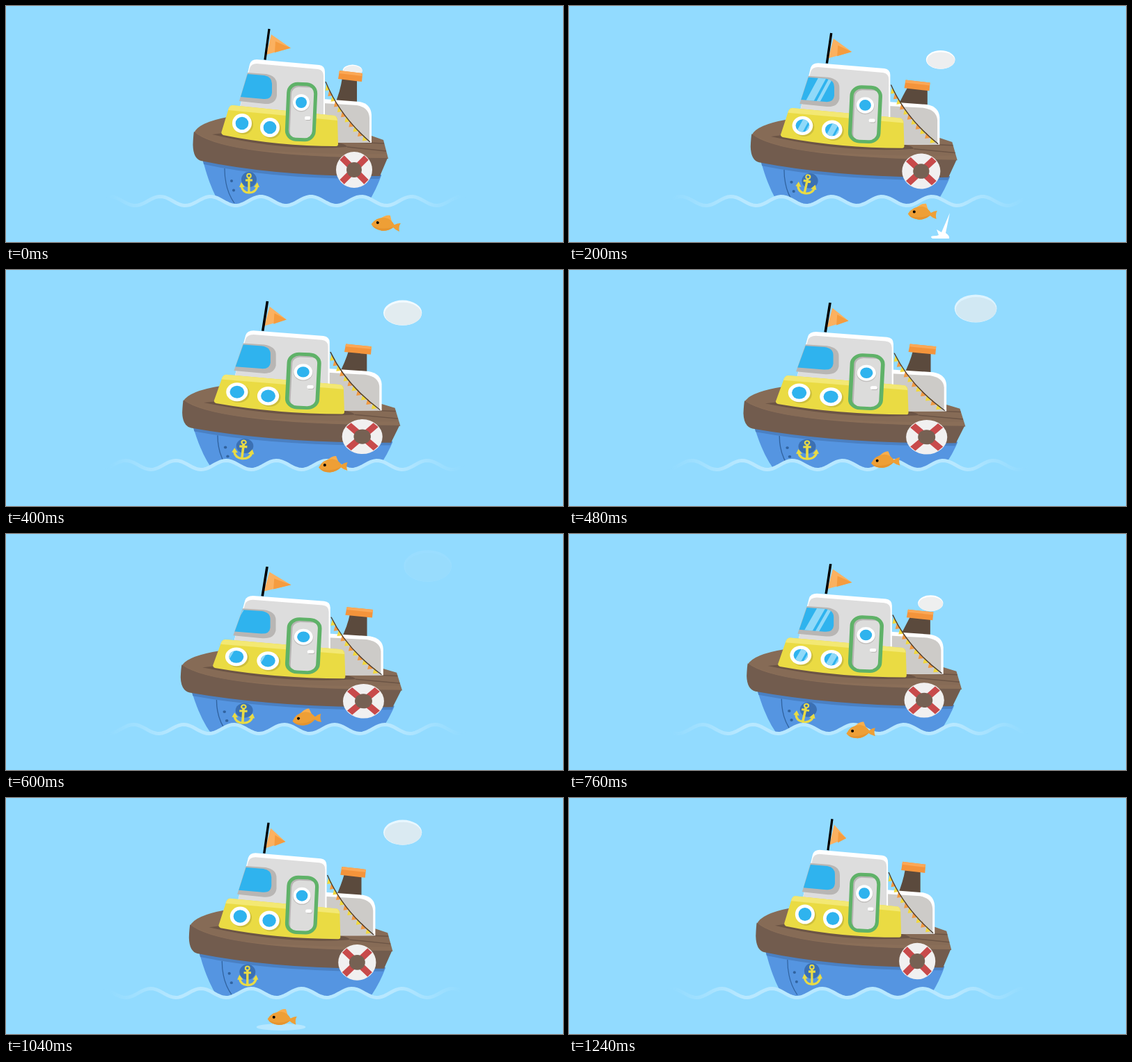
An HTML page that plays this animation: 800 px wide and 340 px high, repeating every 1280 ms.

```html
<!DOCTYPE html>
<html lang="en">
<head>
<meta charset="utf-8">
<title>Tugboat</title>
<style>
  html, body { margin: 0; width: 100%; height: 100%; overflow: hidden; background: #92dbff; }
  svg { display: block; width: 800px; height: 340px; }
</style>
</head>
<body>
<svg viewBox="0 0 800 340">
  <defs>
    <linearGradient id="fade" gradientUnits="userSpaceOnUse" x1="148" x2="654" y1="0" y2="0">
      <stop offset="0" stop-color="#b8e8ff" stop-opacity="0"/>
      <stop offset=".2" stop-color="#b8e8ff"/>
      <stop offset=".8" stop-color="#b8e8ff"/>
      <stop offset="1" stop-color="#b8e8ff" stop-opacity="0"/>
    </linearGradient>
    <clipPath id="paneClip"><path id="pane" d="M347 98L371 100Q382 102 382 112V125Q381 135 370 134L337 131Z"/></clipPath>
    <clipPath id="portClip"><circle r="9.3"/></clipPath>
    <clipPath id="surface"><path d="M0 0H800V331H0Z"/></clipPath>
    <path id="glint" fill="#8fd9f9" d="M5 -20H16L-4 20H-15ZM20 -20H25L5 20H0Z"/>
    <g id="port">
      <circle cx="2" cy="2" r="14" fill="#cdbf3c"/>
      <circle r="14" fill="#fff"/>
      <circle r="9.3" fill="#2fb3ee"/>
      <g clip-path="url(#portClip)"><use class="portGlint" href="#glint"/></g>
    </g>
    <g id="puff">
      <ellipse rx="1" ry="1" fill="#fff"/>
      <ellipse cx=".02" cy=".08" rx=".96" ry=".9" fill="#eeefef"/>
    </g>
  </defs>

  <use id="puffA" href="#puff"/>
  <use id="puffB" href="#puff"/>

  <g id="boat">
    <!-- hull -->
    <path fill="#5595e1" d="M282 219L539 244Q530 270 514 292H312Q294 268 282 219Z"/>
    <path fill="#4a80c3" d="M282 219L539 243L536 249Q385 250 284 228Z"/>
    <path fill="none" stroke="#31639f" stroke-width="1.2" d="M314 234Q314 264 328 284"/>
    <g fill="#31639f"><circle cx="324" cy="252" r="2"/><circle cx="327" cy="265.5" r="2"/></g>
    <circle cx="349" cy="250" r="11" fill="#3b70b3"/>
    <g id="anchor" fill="none" stroke="#e9db45" stroke-width="3.2">
      <circle cx="349" cy="244.5" r="2.8" stroke-width="2"/>
      <path d="M349 247V268M344 251H354M338 259Q340 269 349 269Q359 269 361 259"/>
      <path fill="#e9db45" stroke="none" d="M335 261L338 254L343 261ZM356 261L361 254L364 261Z"/>
    </g>

    <!-- deck -->
    <path fill="#866b56" d="M270 183Q276 168 318 160L525 187L542 193L549 220L400 222L271 195Z"/>
    <path fill="#725c4e" d="M270 181Q310 216 548 219L537 245Q390 246 280 223Q269 220 268.5 200Q269 186 270 181Z"/>
    <path fill="#8a6e58" d="M270 181Q310 207 400 210Q470 214 546 213L548 219Q310 217 270 181Z"/>
    <path fill="#6b5445" d="M296 185Q400 210 490 203Q488 198 470 196L312 183Z"/>
    <path fill="none" stroke="#6b5445" stroke-width="1.5" d="M500 196L543 198M490 203L546 209"/>

    <!-- funnel -->
    <path id="stack" fill="#5b4a3d"/>
    <g id="cap">
      <path fill="#f4943b" d="M479 93L512 97L511 109L477 105Z"/>
      <path fill="#fba856" d="M479 93L512 97L511.5 101L478 97Z"/>
    </g>

    <!-- cabins -->
    <path fill="#fff" d="M456 134L508 138Q524 141 525 157V197H456Z"/>
    <path fill="#cdcbc8" d="M456 140L504 143Q521 146 522 161V197H456Z"/>
    <path fill="#fff" d="M335 150L350 84Q352 77 360 77L450 85Q458 86 458 95V162Z"/>
    <path fill="#ddd" d="M335 150L350 90Q352 83 360 83L448 91Q456 92 456 101V162Z"/>
    <path fill="#b8b6b4" d="M347 96L374 98Q389 101 389 113V129Q387 142 372 141L335 137Z"/>
    <use href="#pane" fill="#2fb3ee"/>
    <g clip-path="url(#paneClip)"><use id="paneGlint" href="#glint"/></g>
    <path fill="#eadb43" d="M325 143L472 158Q475 159 476 163L477 199Q477 202 474 202Q390 202 312 186Q308 184 310 180L320 147Q322 143 325 143Z"/>
    <path fill="#f3e873" d="M325 143L472 158Q475 159 476 165L319 150Q321 143 325 143Z"/>
    <use href="#port" x="339" y="169"/>
    <use href="#port" x="379" y="175"/>

    <!-- door -->
    <g transform="rotate(2.5 424 153)">
      <rect x="404.5" y="112.5" width="39" height="80" rx="13" fill="#b7b5b3"/>
      <rect x="409" y="117" width="35" height="75" rx="10" fill="#dcdcdb"/>
      <rect x="404.5" y="112.5" width="39" height="80" rx="13" fill="none" stroke="#5fb268" stroke-width="5"/>
    </g>
    <circle cx="424" cy="140" r="12.5" fill="#c3c1bf"/>
    <circle cx="424" cy="139" r="12" fill="#fff"/>
    <circle cx="424" cy="139" r="8" fill="#2fb3ee"/>
    <rect x="430" y="160" width="8" height="5" rx="2" fill="#b7b5b3"/>
    <rect x="429" y="159" width="8.5" height="5" rx="2" fill="#fff"/>

    <!-- bunting, flag, life ring -->
    <g id="bunting"></g>
    <path fill="none" stroke="#4a3b30" stroke-width="1.3" d="M459 109Q479 158 523 196"/>
    <path id="flag" fill="#fbb160"/>
    <path id="fold" fill="#f59c3f"/>
    <path stroke="#000" stroke-width="3.2" d="M372 77.5L378 33"/>
    <circle cx="500" cy="236" r="26" fill="#f1f0f0"/>
    <path stroke="#c84a4b" stroke-width="9" d="M482.5 218.5L517.5 253.5M517.5 218.5L482.5 253.5"/>
    <circle cx="500" cy="236" r="11" fill="#766153"/>
  </g>

  <path id="water" fill="#92dbff"/>
  <path id="wave" fill="none" stroke="url(#fade)" stroke-width="5"/>

  <ellipse id="ripple" cx="395" cy="330" fill="#b6e7ff"/>
  <path id="splash" fill="#fff" d="M547 298L541 327Q547 331 546 335H522Q516 331 528 331L531 330L528 322L535 326Z"/>
  <g clip-path="url(#surface)">
    <g id="fish">
      <path fill="#f9ae4d" d="M-8 -6Q0 -13 6 -12L9 -3Z"/>
      <path fill="#ee9f36" d="M-20 3Q-14 -8 0 -8Q8 -7 13 1Q18 -2 22 -2Q19 3 21 10Q15 8 12 5Q5 11 -4 11Q-16 10 -20 3Z"/>
      <path fill="#e5942f" d="M-18 5Q-4 11 12 4Q5 11 -4 11Q-14 10 -18 5Z"/>
      <circle cx="-11" r="2"/>
    </g>
  </g>
</svg>

<script>
const LOOP = 1280, PUFF_EVERY = 640, GUST_EVERY = 560;
const WAVELENGTH = 72.2;
const $ = id => document.getElementById(id);
const set = (id, attrs) => { for (const k in attrs) $(id).setAttribute(k, attrs[k]); };
const clamp01 = v => Math.max(0, Math.min(1, v));
const portGlints = document.querySelectorAll('.portGlint');

function hangBunting(count) {
  for (let i = 1; i <= count; i++) {
    const s = i / (count + 1), r = 1 - s;
    const x = 459 * r * r + 958 * s * r + 523 * s * s;
    const y = 109 * r * r + 316 * s * r + 196 * s * s;
    const color = i % 2 ? '#f1d83e' : '#f29a41';
    $('bunting').innerHTML += `<path fill="${color}" d="M${x - 2} ${y - 4}L${x + 3} ${y + 4}L${x - 4} ${y + 5}Z"/>`;
  }
}

function drawPuff(id, age, y, speed, life) {
  const size = `${14 + .034 * age} ${8.5 + .024 * age}`;
  set(id, {
    transform: `translate(${497.5 + .18 * age} ${y - speed * age}) scale(${size})`,
    opacity: age < 0 ? 0 : clamp01(1 - (age / life) ** 5)
  });
}

function drawBoat(t) {
  // The boat spreads at a steady rate, rests, then springs back.
  const widen = Math.min(1, t / 470, (1250 - t) / 660);
  const squash = Math.min(1, t / 470, (1140 - t) / 530);
  set('boat', { transform: `translate(400 340) scale(${1 + .137 * widen} ${1 - .046 * squash}) translate(-400 -340)` });

  const gust = t < GUST_EVERY ? t : t - GUST_EVERY;
  const tip = 409 - .016 * gust;
  set('flag', { d: `M381 41L${tip} 60.5L374 70Z` });
  set('fold', { d: `M387 51L${tip} 60.5L386 67Z` });
  const swing = 12 * Math.max(0, Math.sin(Math.PI * gust / 480));
  set('anchor', { transform: `rotate(${swing} 349 232)` });
  set('paneGlint', { transform: `translate(${352 + .2 * (gust - 180)} 117)` });
  for (const el of portGlints) el.setAttribute('transform', `translate(${.12 * (gust - 200)} 0) scale(.8)`);

  // Each puff makes the funnel duck quickly and recover slowly.
  const kick = (t % PUFF_EVERY) / 180;
  const drop = 9 * kick ** 2 * Math.exp(2 - 2 * kick);
  const flare = drop * .5, top = 103 + drop;
  set('cap', { transform: `translate(0 ${drop})` });
  set('stack', { d: `M${483 - flare * .2} ${top}L${504 + flare} ${top + 3}L${504 + flare} 142H${472 - flare}Q${480 - flare} 124 ${483 - flare * .2} ${top}Z` });
}

function drawWater(t) {
  const points = [];
  for (let x = 140; x <= 660; x += 4) {
    const phase = (x - 221.5) / WAVELENGTH - t / LOOP;
    points.push(`${x} ${281 - 6.5 * Math.cos(2 * Math.PI * phase)}`);
  }
  const line = 'M' + points.join('L');
  set('wave', { d: line });
  set('water', { d: line + 'V340H140Z' });

  const spread = clamp01((t - 920) / 130);
  set('ripple', { rx: 38 * spread, ry: 5.3 * spread, opacity: 1 - clamp01((t - 1080) / 130) });
  const rise = t < 340 ? Math.max(0, Math.sin(Math.PI * (t - 60) / 280)) : 0;
  set('splash', { transform: `translate(0 335) scale(1 ${rise}) translate(0 -335)` });
}

function drawFish(t) {
  const late = t - 600;
  const x = 431 - (late < 0 ? .19 : .08) * late;
  const y = 264 + (late < 0 ? -.082 : .118) * late;
  const turn = .022 * Math.abs(late) - 8;
  set('fish', { transform: `translate(${x} ${y}) rotate(${turn})`, opacity: t < 1190 ? 1 : 0 });
}

function draw(t) {
  drawPuff('puffA', t, 93, .078, 610);
  drawPuff('puffB', t - PUFF_EVERY, 121.4, .179, 550);
  drawBoat(t);
  drawWater(t);
  drawFish(t);
}

function tick() {
  draw(performance.now() % LOOP);
  requestAnimationFrame(tick);
}

hangBunting(11);
tick();
</script>
</body>
</html>
```
